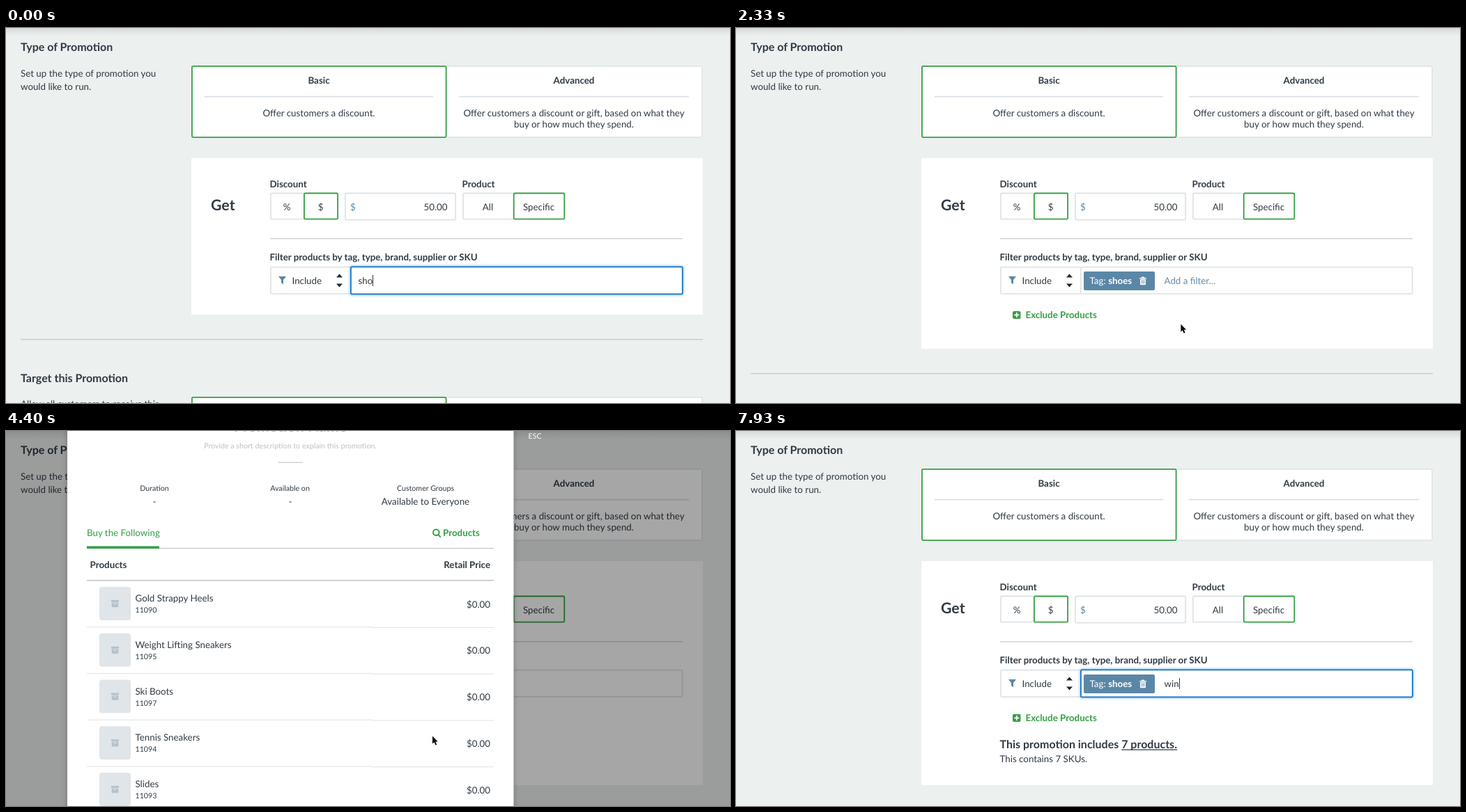
These frames come from a looping animation (1039x539 px, 8000 ms). An HTML page with a canvas:

```html
<!DOCTYPE html>
<html lang="en">
<head>
<meta charset="utf-8">
<title>Promotion setup</title>
<style>
html, body { margin: 0; width: 100%; height: 100%; overflow: hidden; background: #ecf0ef; }
canvas { display: block; width: 1039px; height: 539px; }
</style>
</head>
<body>
<canvas id="stage"></canvas>
<script>
const W = 1039, H = 539, LOOP = 8000;
const canvas = document.getElementById('stage');
const dpr = window.devicePixelRatio || 1;
canvas.width = Math.round(W * dpr);
canvas.height = Math.round(H * dpr);
const c = canvas.getContext('2d');

const INK = '#2f3a44', GREEN = '#359f43', EDGE = '#dfe4e6', BLUE = '#1277c8', STEEL = '#5b87a6';
const S = 10.67, M = 13.33, L = 16, XL = 21.33;

// Moments in the story, in ms
const PICK = 2000, COUNTED = 2400, OPEN = 3330, LOADED = 3600, CLOSE = 6000, FOCUS = 7130, TYPE = 7670;

const PRODUCTS = [
  ['Gold Strappy Heels', 11090], ['Weight Lifting Sneakers', 11095], ['Ski Boots', 11097],
  ['Tennis Sneakers', 11094], ['Slides', 11093]
];

// Pointer path: time, x, y
const PATH = [
  [1130, 690, 362], [1470, 684, 383], [1900, 640, 424], [2200, 640, 424], [3130, 610, 455],
  [3700, 610, 455], [4070, 610, 445], [4360, 610, 445], [4730, 668, 252], [4880, 668, 252],
  [5330, 749, 27], [5500, 749, 27], [5670, 759, -18], [6230, 762, -18], [6730, 702, 398], [7070, 690, 365]
];

const clamp = v => Math.max(0, Math.min(1, v));
const ramp = (t, a, b) => clamp((t - a) / (b - a));
const smooth = p => p * p * (3 - 2 * p);

function text(str, x, y, { size = M, bold = false, color = INK, align = 'left' } = {}) {
  c.font = `${bold ? 700 : 400} ${size}px Lato, sans-serif`;
  c.textRendering = 'geometricPrecision';
  c.fillStyle = color;
  c.textAlign = align;
  c.fillText(str, x, y);
  return c.measureText(str).width;
}

function fillBox(x, y, w, h, color, r = 0) {
  c.fillStyle = color;
  c.beginPath();
  c.roundRect(x, y, w, h, r);
  c.fill();
}

function frameBox(x, y, w, h, edge, fill = '#fff') {
  fillBox(x, y, w, h, fill, 2);
  c.strokeStyle = edge;
  c.lineWidth = 1.8;
  c.beginPath();
  c.roundRect(x + 0.9, y + 0.9, w - 1.8, h - 1.8, 1.5);
  c.stroke();
}

function shape(points, color) {
  c.beginPath();
  points.forEach(([x, y]) => c.lineTo(x, y));
  c.closePath();
  c.fillStyle = color;
  c.fill();
}

function caret(x) {
  fillBox(Math.round(x), 355, 1, 16, INK);
}

function pointer(t) {
  if (t < PATH[0][0] || t >= TYPE) return null;
  const next = PATH.findIndex(k => k[0] > t);
  if (next < 0) return { x: 690, y: 365 };
  const [t0, x0, y0] = PATH[next - 1], [t1, x1, y1] = PATH[next];
  const p = smooth(ramp(t, t0, t1));
  return { x: x0 + (x1 - x0) * p, y: y0 + (y1 - y0) * p };
}

const within = (p, x0, y0, x1, y1) => !!p && p.x > x0 && p.x < x1 && p.y > y0 && p.y < y1;

function drawPointer(p, kind) {
  c.save();
  c.translate(p.x, p.y);
  c.lineJoin = 'round';
  if (kind === 'beam') {
    c.strokeStyle = '#222';
    c.lineWidth = 1;
    c.beginPath();
    c.moveTo(-3, -7.5); c.quadraticCurveTo(0, -7.5, 0, -5.5);
    c.lineTo(0, 5.5); c.quadraticCurveTo(0, 7.5, -3, 7.5);
    c.moveTo(3, -7.5); c.quadraticCurveTo(0, -7.5, 0, -5.5);
    c.moveTo(0, 5.5); c.quadraticCurveTo(0, 7.5, 3, 7.5);
    c.stroke();
  } else if (kind === 'hand') {
    c.beginPath();
    c.moveTo(-1.5, 1.5);
    c.quadraticCurveTo(0, -0.5, 1.6, 1.5);
    c.lineTo(2, 5);
    c.quadraticCurveTo(3.5, 4, 4.3, 5.6);
    c.quadraticCurveTo(5.8, 4.8, 6.4, 6.4);
    c.quadraticCurveTo(8.2, 6, 8.3, 8);
    c.quadraticCurveTo(8.2, 12, 6.5, 15);
    c.lineTo(0, 15);
    c.quadraticCurveTo(-2, 12, -4.6, 9);
    c.quadraticCurveTo(-4.4, 6.8, -2.2, 8.2);
    c.lineTo(-1, 9);
    c.closePath();
    c.fillStyle = '#fff';
    c.fill();
    c.strokeStyle = '#1c1c1c';
    c.lineWidth = 1.1;
    c.moveTo(2, 5); c.lineTo(2, 8);
    c.moveTo(4.3, 5.6); c.lineTo(4.3, 8);
    c.stroke();
  } else {
    c.beginPath();
    [[0, 0], [0, 11], [2.5, 8.8], [4.4, 13.2], [6.2, 12.4], [4.3, 8.2], [7.7, 8]].forEach(q => c.lineTo(...q));
    c.closePath();
    c.strokeStyle = '#fff';
    c.lineWidth = 1.8;
    c.stroke();
    c.fillStyle = '#000';
    c.fill();
  }
  c.restore();
}

function drawTypeCards() {
  text('Type of Promotion', 21, 33, { size: L, bold: true });
  text('Set up the type of promotion you', 21, 70);
  text('would like to run.', 21, 89);
  frameBox(631, 54, 369, 104, EDGE);
  frameBox(266, 54, 366.5, 104, GREEN);
  fillBox(285, 97.8, 328, 1.7, '#d9e0e7');
  fillBox(650, 97.8, 330, 1.7, '#d9e0e7');
  text('Basic', 449, 80, { bold: true, align: 'center' });
  text('Advanced', 815, 80, { bold: true, align: 'center' });
  text('Offer customers a discount.', 449, 127, { align: 'center' });
  text('Offer customers a discount or gift, based on what they', 815, 127, { align: 'center' });
  text('buy or how much they spend.', 815, 143, { align: 'center' });
}

function drawDiscount(bottom) {
  fillBox(266, 187, 734, bottom - 187, '#fff');
  text('Get', 294, 262, { size: XL, bold: true });
  text('Discount', 378.5, 229, { bold: true });
  text('Product', 654.5, 229, { bold: true });
  frameBox(379, 236.6, 50, 39, EDGE);
  frameBox(427, 236.6, 50, 39, GREEN);
  frameBox(486, 236.6, 160, 40, EDGE);
  frameBox(655, 236.6, 75, 39, EDGE);
  frameBox(727.8, 236.6, 74.4, 39, GREEN);
  text('%', 403, 261.5, { align: 'center' });
  text('$', 451.5, 261.5, { align: 'center' });
  text('$', 494, 262, { color: STEEL });
  text('50.00', 633.5, 262.4, { align: 'right' });
  text('All', 691.5, 261.5, { align: 'center' });
  text('Specific', 764.5, 261.5, { align: 'center' });
  fillBox(379, 302, 592, 1.6, '#d0d4d6');
}

function drawTag() {
  fillBox(499, 350, 102, 27, STEEL, 2);
  const w = text('Tag: ', 507.5, 368, { color: '#fff' });
  text('shoes', 507.5 + w, 368, { bold: true, color: '#fff' });
  fillBox(579, 359, 10, 1.4, '#fff');
  fillBox(582, 357.6, 4, 1.6, '#fff');
  fillBox(580, 361, 8, 8.2, '#fff', 1);
  for (const x of [581.8, 583.7, 585.6]) fillBox(x, 362.3, 0.8, 5.2, STEEL);
}

function drawFilter(t, tagged) {
  text('Filter products by tag, type, brand, supplier or SKU', 378.5, 334, { bold: true });
  frameBox(379, 342.8, 117, 40.2, EDGE);
  shape([[391, 357], [402, 357], [398, 362], [398, 368.5], [395, 366], [395, 362]], STEEL);
  text('Include', 410.5, 368);
  shape([[474, 358.5], [478.5, 353.5], [483, 358.5]], '#20272d');
  shape([[474, 367.5], [478.5, 372.5], [483, 367.5]], '#20272d');

  frameBox(494, 342.8, 477.5, 40.2, EDGE);
  const focus = t < FOCUS ? 1 - ramp(t, PICK, PICK + 150) : smooth(ramp(t, FOCUS, 7400));
  if (focus > 0) {
    c.save();
    c.globalAlpha = focus;
    c.save();
    c.shadowColor = 'rgba(18,119,200,.6)';
    c.shadowBlur = 4;
    fillBox(494, 342.5, 477.7, 40.8, BLUE, 2);
    c.restore();
    frameBox(494, 342.5, 477.7, 40.8, BLUE);
    c.restore();
  }

  if (!tagged) {
    const typed = t < 70 ? 'sho' : t < 170 ? 'shoe' : 'shoes';
    caret(505.5 + text(typed, 505.5, 368));
    return;
  }
  drawTag();
  if (t < TYPE) {
    text('Add a filter...', 614.5, 368, { color: '#628ba9' });
    if (t >= FOCUS) caret(614);
  } else {
    const typed = t < 7870 ? 'w' : t < 7930 ? 'wi' : 'win';
    caret(614.5 + text(typed, 614.5, 368));
  }
}

function drawSummary(t, hover) {
  fillBox(397, 407, 11.5, 11, GREEN, 2);
  fillBox(399.3, 411.6, 7, 1.8, '#fff');
  fillBox(401.9, 409, 1.8, 7, '#fff');
  text('Exclude Products', 415.5, 417, { bold: true, color: GREEN });
  if (t < COUNTED) return;
  const x = 378.5 + text('This promotion includes ', 378.5, 456, { size: L, bold: true });
  const color = hover ? BLUE : INK;
  const w = text('7 products.', x, 456, { size: L, bold: true, color });
  fillBox(x, 457.6, w, 1.2, color);
  text('This contains 7 SKUs.', 378.5, 476);
}

function drawTarget(shift) {
  fillBox(21, 447 + shift, 979, 1.2, '#c3c8c8');
  text('Target this Promotion', 21, 509 + shift, { size: L, bold: true });
  text('Allow all customers to receive this', 21, 545 + shift);
  frameBox(631, 530 + shift, 369, 104, EDGE);
  frameBox(266, 530 + shift, 366.5, 104, GREEN);
}

function drawMenu() {
  c.save();
  c.shadowColor = 'rgba(0,0,0,.45)';
  c.shadowBlur = 7;
  c.shadowOffsetY = 2;
  fillBox(495, 395, 476, 54, '#fff', 3);
  c.restore();
  shape([[509, 396], [516.5, 388], [524, 396]], '#fff');
  c.strokeStyle = '#e4e7e9';
  c.lineWidth = 1;
  c.beginPath();
  c.moveTo(509.5, 395); c.lineTo(516.5, 388); c.lineTo(523.5, 395);
  c.stroke();
  fillBox(495, 402, 476, 47, '#dfecfa', [0, 0, 3, 3]);
  text('shoes', 516.5, 430, { bold: true });
  fillBox(558, 416, 31, 18, '#d2dde5', 2);
  text('TAG', 573.5, 429, { size: 8.9, bold: true, color: STEEL, align: 'center' });
}

function drawRow([name, code], y) {
  fillBox(134, y + 9, 45, 48, '#e0e5e9', 4);
  fillBox(151, y + 28, 11, 3, '#b6c2cb');
  fillBox(151.7, y + 31.8, 9.6, 6.4, '#b6c2cb', 1);
  fillBox(154.8, y + 33, 3.4, 1.1, '#e0e5e9');
  text(name, 185.5, y + 30);
  text(code, 185.5, y + 46, { size: S });
  text('$0.00', 695, y + 38.5, { align: 'right' });
  fillBox(116, y + 66.2, 409, 1, '#dfe2e4');
  fillBox(525, y + 67, 175, 1, '#dfe2e4');
}

function drawModal(t) {
  const loaded = t >= LOADED;
  const mid = { align: 'center' }, small = { size: S, align: 'center' };
  c.fillStyle = 'rgba(0,0,0,.35)';
  c.fillRect(0, 0, W, H);
  c.save();
  c.translate(0, -201 * smooth(ramp(t, 3700, 4070)));

  c.save();
  c.shadowColor = 'rgba(0,0,0,.25)';
  c.shadowBlur = 8;
  fillBox(88, 152, 640.5, loaded ? 760 : 358.5, '#fff', 3);
  c.restore();

  fillBox(737, 152, 45, 45, '#fff', 22.5);
  c.strokeStyle = '#b3c5d5';
  c.lineWidth = 1.7;
  c.beginPath();
  c.moveTo(754, 169); c.lineTo(764.5, 179.5);
  c.moveTo(764.5, 169); c.lineTo(754, 179.5);
  c.stroke();
  text('ESC', 759, 212, { ...small, color: '#fff' });

  text('Promotion Name', 408, 202, { size: XL, bold: true, color: '#b8bdc2', align: 'center' });
  text('Provide a short description to explain this promotion.', 408, 226, { ...small, color: '#bcc1c5' });
  fillBox(390.5, 245.5, 35.5, 1.4, '#cdd1d5');
  text('Duration', 213, 287, small);
  text('Available on', 407.5, 287, small);
  text('Customer Groups', 602, 287, small);
  text('-', 213, 307, mid);
  text('-', 408, 307, mid);
  text('Available to Everyone', 602, 307, mid);

  fillBox(116, 369, 584, 1.2, '#c2c6c8');
  fillBox(116, 366.5, 104, 3.5, GREEN);
  text('Buy the Following', 116, 352, { color: GREEN });
  c.strokeStyle = GREEN;
  c.lineWidth = 2;
  c.beginPath();
  c.arc(617.3, 346.8, 4.3, 0, 7);
  c.moveTo(620.4, 350); c.lineTo(623.8, 353.6);
  c.stroke();
  text('Products', 627, 352, { bold: true, color: GREEN });
  text('Products', 120.5, 398, { bold: true });
  text('Retail Price', 695, 398, { bold: true, align: 'right' });
  fillBox(116, 415, 584, 1.4, '#c0c4c6');

  if (loaded) {
    PRODUCTS.forEach((item, i) => drawRow(item, 416 + 66.75 * i));
  } else {
    const a = (t - OPEN) / 1000 * Math.PI * 2;
    c.strokeStyle = GREEN;
    c.lineWidth = 2;
    c.beginPath();
    c.arc(408.5, 462.3, 9.8, a - Math.PI * 0.75, a + Math.PI * 0.75);
    c.stroke();
  }
  c.restore();
}

function draw(t) {
  const tagged = t >= PICK, modal = t >= OPEN && t < CLOSE;
  const shift = !tagged ? 0 : t < COUNTED ? 49 : 97;
  const p = pointer(t);
  const onLink = !modal && t >= COUNTED && within(p, 553, 441, 633, 461);
  const onMenu = !tagged && within(p, 495, 395, 971, 449);
  const onInput = !modal && within(p, 494, 343, 971, 380);

  c.setTransform(dpr, 0, 0, dpr, 0, 0);
  c.fillStyle = '#ecf0ef';
  c.fillRect(0, 0, W, H);
  drawTypeCards();
  drawDiscount(412 + shift);
  drawFilter(t, tagged);
  if (tagged) drawSummary(t, onLink);
  drawTarget(shift);
  const shade = c.createLinearGradient(0, 0, 0, 12);
  shade.addColorStop(0, 'rgba(0,0,0,.09)');
  shade.addColorStop(1, 'rgba(0,0,0,0)');
  c.fillStyle = shade;
  c.fillRect(0, 0, W, 12);
  if (t >= 670 && !tagged) drawMenu();
  if (modal) drawModal(t);
  if (p) drawPointer(p, onInput ? 'beam' : onLink || onMenu ? 'hand' : 'arrow');
}

const start = performance.now();
function tick(now) {
  draw(Math.max(0, now - start) % LOOP);
  requestAnimationFrame(tick);
}
draw(0);
requestAnimationFrame(tick);
</script>
</body>
</html>
```
